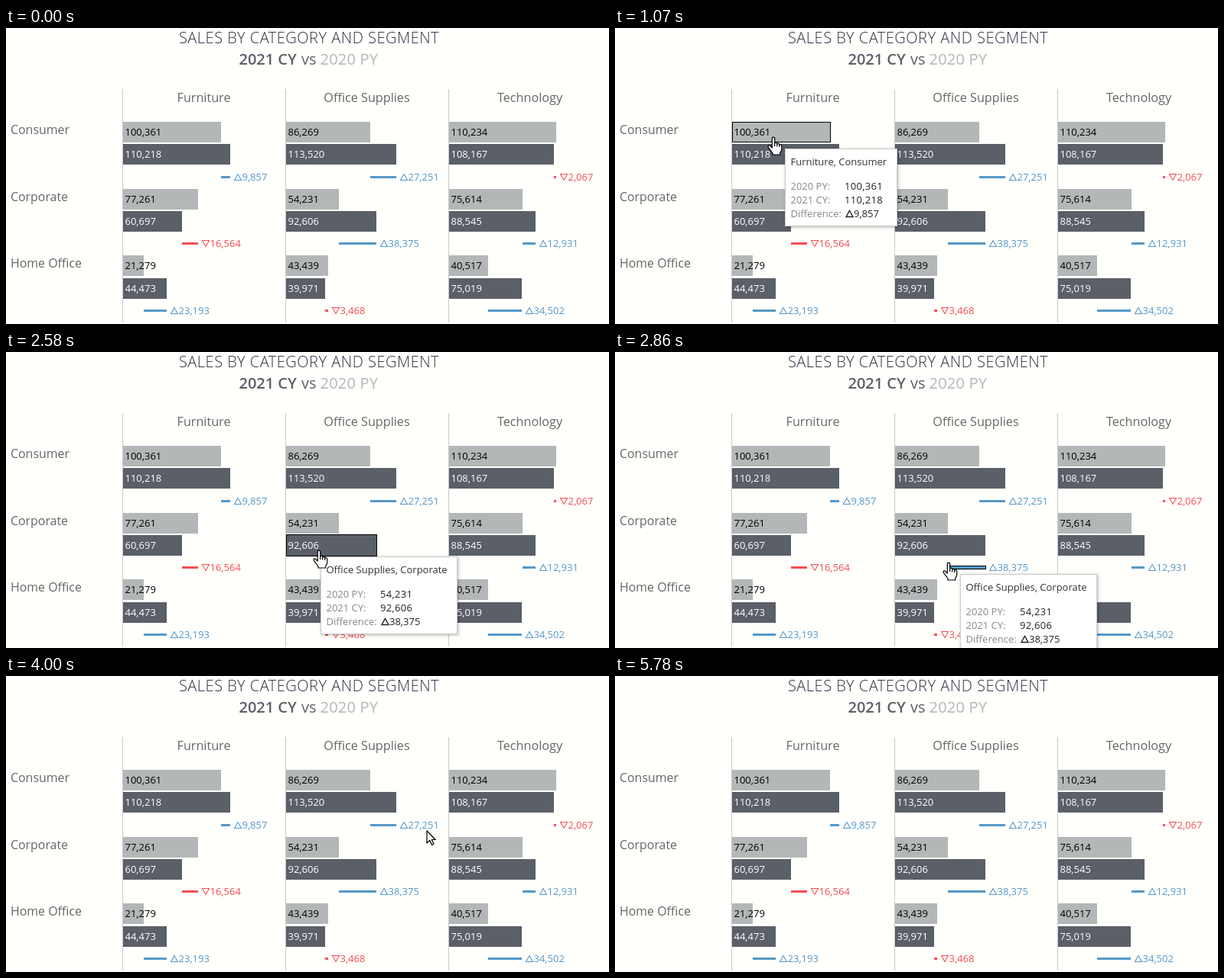
Recreate the animation shown at these times as an HTML page with a canvas. Size 788 by 388 pixels, loop 6070 ms.

```html
<!DOCTYPE html>
<html lang="en">
<head>
<meta charset="utf-8">
<title>Sales by category and segment</title>
<style>
  html, body { margin: 0; width: 100%; height: 100%; overflow: hidden; background: #fffffc; }
  canvas { display: block; }
</style>
</head>
<body>
<canvas id="stage" width="788" height="388"></canvas>
<script>
const ctx = document.getElementById('stage').getContext('2d');
const LOOP = 6070, ENTER = 220, EXIT = 5780, TIP_LAG = 40, TIP_GAP = 15;
const PX_PER_UNIT = 0.001271, ROW_PITCH = 87.6, BAR_PITCH = 29.4;
const BLUE = '#5499c7', RED = '#f54e50', PY_COLOR = '#b3b7b8', CY_COLOR = '#5b5f68';

const rows = ['Consumer', 'Corporate', 'Home Office'];
// Previous and current year for each row of a category
const sales = {
  'Furniture': [[100361, 110218], [77261, 60697], [21279.4, 44472.6]],
  'Office Supplies': [[86269, 113520], [54231, 92606], [43439, 39971]],
  'Technology': [[110234, 108167], [75614, 88545], [40517, 75019]]
};
const columns = Object.keys(sales);
const columnX = c => 153 + 213 * c;

// The pointer glides to each stop and rests there until the next one
const start = { x: 788, y: 384 };
const stops = [
  { from: ENTER, to: 740, x: 214, y: 163 },
  { from: 830, to: 1070, x: 207, y: 143 },
  { from: 2290, to: 2860, x: 436, y: 276 },
  { from: 2880, to: 2980, x: 445, y: 281 },
  { from: 3800, to: 4320, x: 581, y: 179 },
  { from: 4400, to: 4520, x: 468, y: 179 },
  { from: 5460, to: EXIT, x: 650, y: 388 }
];

const hand = new Path2D('M-1.7 1.2Q0 -1 1.7 1.2V8Q3.4 6.4 4.7 8V9Q6.4 7.6 7.7 9V10' +
  'Q9.8 9 10.8 11.2V16Q10.4 19 8.7 20.4V23H-1V21Q-4 17 -6.8 13.2Q-7.4 10.4 -4.8 11L-1.7 14Z');
const knuckles = new Path2D('M1.7 8V12M4.7 9V12.5M7.7 10V13');
const arrow = new Path2D('M0 0V16L3.8 12.5L6.5 18.5L9 17.5L6.3 11.5H11.3Z');

// pad widens the hover area, rim is how far the hover outline reaches outside
const marks = columns.flatMap((name, c) => sales[name].flatMap(([py, cy], r) => {
  const x = columnX(c), top = 123 + r * ROW_PITCH, diff = cy - py;
  const wPy = Math.round(py * PX_PER_UNIT), wCy = Math.round(cy * PX_PER_UNIT);
  const base = { title: `${name}, ${rows[r]}`, py, cy, diff, x };
  const bar = { ...base, h: 27, pad: 1 };
  return [
    { ...bar, y: Math.round(top), w: wPy, rim: 0, fill: PY_COLOR, ink: '#000', label: py },
    { ...bar, y: Math.round(top + BAR_PITCH), w: wCy, rim: 1, fill: CY_COLOR, ink: '#fff', label: cy },
    { ...base, x: x + Math.min(wPy, wCy), y: Math.floor(top + 71), w: Math.abs(wCy - wPy),
      h: 3, pad: 6, rim: 1, fill: diff > 0 ? BLUE : RED }
  ];
}));

const font = (size, weight = 400) => `${weight} ${size}px "Open Sans", "Noto Sans", sans-serif`;
const comma = n => Math.round(Math.abs(n)).toLocaleString('en-US');

function text(str, x, y, color, size = 13, weight = 400, align = 'left', spacing = 0) {
  ctx.font = font(size, weight);
  ctx.letterSpacing = spacing + 'px';
  ctx.textAlign = align;
  ctx.fillStyle = color;
  ctx.fillText(str, x, y);
}

function change(diff, x, y, color, weight = 400) {
  const [tip, base] = diff > 0 ? [y - 8.5, y - 0.5] : [y - 0.5, y - 8.5];
  ctx.beginPath();
  ctx.moveTo(x + 0.5, base);
  ctx.lineTo(x + 9.5, base);
  ctx.lineTo(x + 5, tip);
  ctx.closePath();
  ctx.strokeStyle = color;
  ctx.lineWidth = weight > 400 ? 1.4 : 1.1;
  ctx.stroke();
  text(comma(diff), x + 10.5, y, color, 13, weight);
}

function drawChart() {
  ctx.fillStyle = '#fffffc';
  ctx.fillRect(0, 0, 788, 388);
  text('SALES BY CATEGORY AND SEGMENT', 396, 20, '#2f3342', 20, 300, 'center', 0.5);
  text('2021 CY', 304.5, 48, '#5b5f68', 20, 600);
  text('vs', 386, 48, '#5b5f68', 20);
  text('2020 PY', 410.5, 48, '#b3b7b8', 20, 500, 'left', 0.2);
  rows.forEach((name, r) => text(name, 6, Math.round(139 + r * ROW_PITCH), '#666', 15.9, 500));
  columns.forEach((name, c) => {
    text(name, columnX(c) + 105.5, 97, '#666', 16.2, 500, 'center');
    ctx.fillStyle = '#c9c9c9';
    ctx.fillRect(columnX(c) - 1, 80, 1, 306);
  });
  for (const m of marks) {
    ctx.fillStyle = m.fill;
    ctx.fillRect(m.x, m.y, m.w, m.h);
    if (m.label) text(comma(m.label), m.x + 2.5, m.y + 18, m.ink);
    else change(m.diff, m.x + m.w + 5, m.y + 6, m.fill);
  }
}

function pointerAt(t) {
  if (t < ENTER || t >= EXIT) return null;
  const next = stops.findLastIndex(s => s.from <= t);
  const a = stops[next - 1] || start, b = stops[next];
  const k = Math.min(1, (t - b.from) / (b.to - b.from));
  const eased = 1 - (1 - k) ** 3;
  return { x: Math.round(a.x + (b.x - a.x) * eased), y: Math.round(a.y + (b.y - a.y) * eased) };
}

const markAt = p => p && marks.find(m =>
  p.x >= m.x - 1 && p.x <= m.x + m.w + 1 && p.y >= m.y - m.pad && p.y <= m.y + m.h + m.pad);

function drawOutline({ x, y, w, h, rim }) {
  ctx.strokeStyle = '#000';
  ctx.lineWidth = 1;
  ctx.strokeRect(x + 0.5, y - rim + 0.5, w, h - 1 + 2 * rim);
}

function drawTooltip(m, x, y) {
  ctx.font = font(13);
  ctx.letterSpacing = '0px';
  const width = Math.round(ctx.measureText(m.title).width) + 21;
  ctx.save();
  ctx.shadowColor = 'rgba(0,0,0,.3)';
  ctx.shadowBlur = 4;
  ctx.shadowOffsetX = ctx.shadowOffsetY = 1;
  ctx.fillStyle = '#fff';
  ctx.fillRect(x, y, width, 102);
  ctx.restore();
  ctx.strokeStyle = '#ccc';
  ctx.lineWidth = 1;
  ctx.strokeRect(x + 0.5, y + 0.5, width - 1, 101);
  text(m.title, x + 7.5, y + 22, '#333', 13, 500);
  ['2020 PY:', '2021 CY:', 'Difference:'].forEach((label, i) =>
    text(label, x + 7.5, y + 54 + i * 18, '#888'));
  [m.py, m.cy].forEach((value, i) =>
    text(comma(value), x + 78, y + 54 + i * 18, '#222', 13, 500, 'left', 0.3));
  change(m.diff, x + 79.5, y + 90, '#222', 500);
}

function drawPointer({ x, y }, overMark) {
  ctx.save();
  ctx.translate(x, y);
  ctx.fillStyle = '#fff';
  ctx.strokeStyle = '#000';
  ctx.lineWidth = 1.2;
  ctx.lineJoin = 'round';
  const shape = overMark ? hand : arrow;
  ctx.fill(shape);
  ctx.stroke(shape);
  if (overMark) ctx.stroke(knuckles);
  ctx.restore();
}

function frame(now) {
  const t = now % LOOP;
  const pointer = pointerAt(t), trailing = pointerAt(t - TIP_LAG);
  const hovered = markAt(pointer);
  drawChart();
  if (hovered) {
    drawOutline(hovered);
    if (markAt(trailing) === hovered) drawTooltip(hovered, trailing.x + TIP_GAP, trailing.y + TIP_GAP);
  }
  if (pointer) drawPointer(pointer, hovered);
  requestAnimationFrame(frame);
}
requestAnimationFrame(frame);
</script>
</body>
</html>
```
